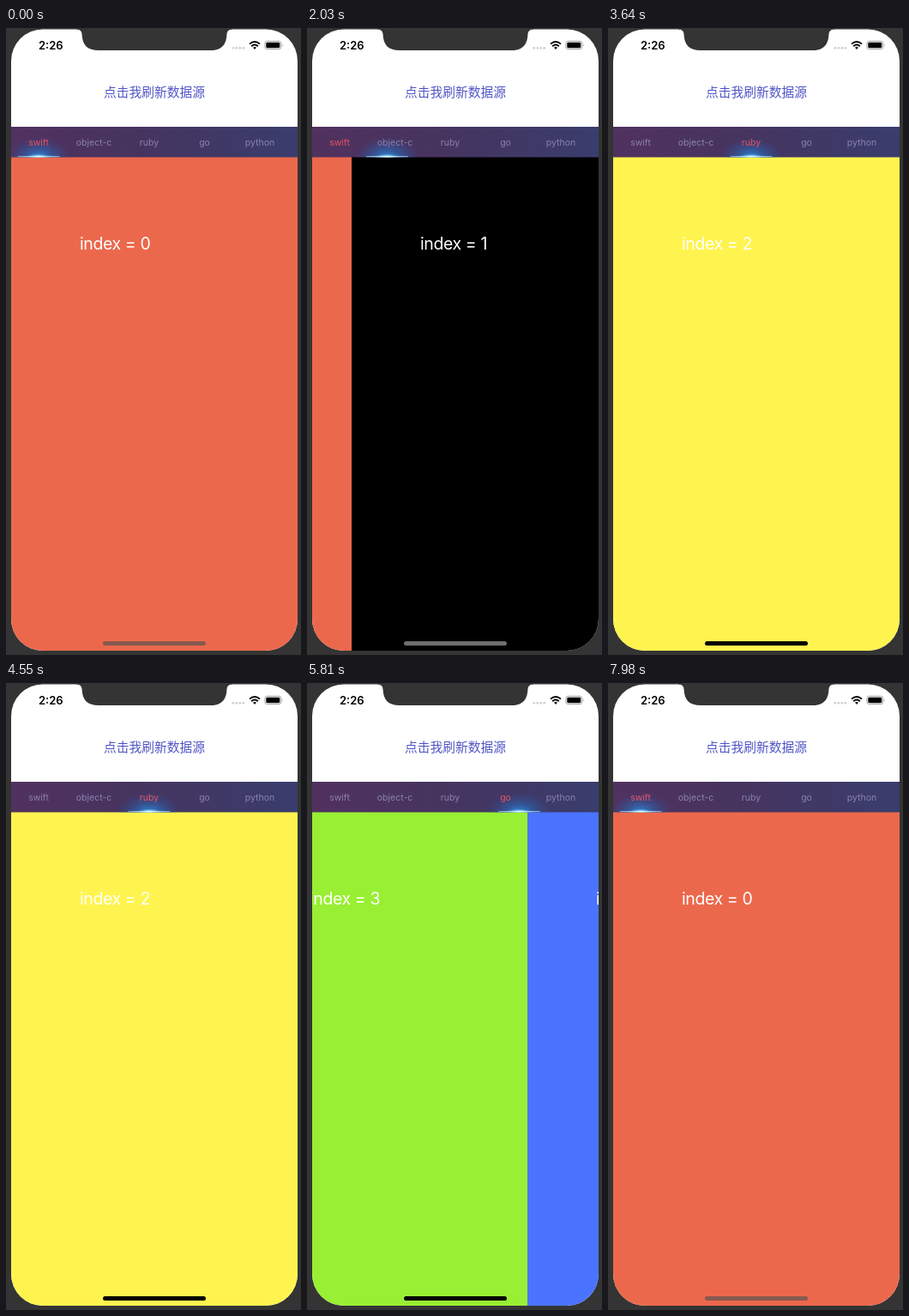
An HTML page for the animation above (8 s loop, 344 px wide and 730 px high).

```html
<!DOCTYPE html>
<html lang="zh">
<head>
<meta charset="utf-8">
<style>
html, body { margin: 0; width: 100%; height: 100%; overflow: hidden; background: #343434; }
svg { display: block; width: 344px; height: 730px; font-family: Inter, Roboto, sans-serif; }
.tab { font-size: 10.5px; text-anchor: middle; fill: #8a81ae; }
.tab.on { fill: #e9535f; }
.page { font-size: 19.5px; letter-spacing: -.4px; fill: #fff; }
.title { font: 14.75px "Noto Sans CJK SC", "Noto Sans CJK", sans-serif; fill: #5056c4; text-anchor: middle; }
</style>
</head>
<body>
<svg viewBox="0 0 344 730">
  <defs>
    <clipPath id="screen"><rect x="6" y="1.5" width="334" height="723.5" rx="37"/></clipPath>
    <clipPath id="barClip"><rect x="6" y="115" width="334" height="35.5"/></clipPath>
    <linearGradient id="bar">
      <stop stop-color="#51315f"/><stop offset=".45" stop-color="#46345f"/><stop offset="1" stop-color="#393d6d"/>
    </linearGradient>
    <radialGradient id="halo">
      <stop stop-color="#318fdd"/><stop offset=".4" stop-color="#2b68b4" stop-opacity=".65"/>
      <stop offset="1" stop-color="#2f4a90" stop-opacity="0"/>
    </radialGradient>
    <radialGradient id="spark">
      <stop stop-color="#fff"/><stop offset=".4" stop-color="#a5e6ff" stop-opacity=".9"/>
      <stop offset="1" stop-color="#4fb4f4" stop-opacity="0"/>
    </radialGradient>
    <linearGradient id="line">
      <stop stop-color="#6d9fd0"/><stop offset=".5" stop-color="#e4faff"/><stop offset="1" stop-color="#6d9fd0"/>
    </linearGradient>
  </defs>
  <g clip-path="url(#screen)">
    <rect width="344" height="730" fill="#fff"/>
    <g id="pages"></g>
    <rect x="6" y="115" width="334" height="35.5" fill="url(#bar)"/>
    <g clip-path="url(#barClip)">
      <g id="glow">
        <ellipse cy="151" rx="38" ry="24" fill="url(#halo)"/>
        <ellipse cy="150.5" rx="15" ry="4" fill="url(#spark)"/>
        <rect x="-24.5" y="149" width="49" height="1.5" fill="url(#line)"/>
      </g>
    </g>
    <g id="tabs"></g>
    <text class="title" x="173" y="80">点击我刷新数据源</text>
    <text x="38" y="24.8" font-size="13" font-weight="600">2:26</text>
    <g fill="#cfcfcf">
      <circle cx="264.8" cy="23.3" r="1.4"/><circle cx="268.8" cy="23.3" r="1.4"/>
      <circle cx="272.8" cy="23.3" r="1.4"/><circle cx="276.8" cy="23.3" r="1.4"/>
    </g>
    <g fill="none" stroke="#000" stroke-width="1.9">
      <path d="M284 18.6Q290 13.4 296 18.6M286.2 21.2Q290 17.8 293.8 21.2"/>
      <path d="M288 22.8Q290 21.2 292 22.8L290 25Z" fill="#000" stroke="none"/>
    </g>
    <rect x="301.9" y="15.3" width="18.8" height="9.4" rx="2.6" fill="none" stroke="#999" stroke-width=".9"/>
    <rect x="303.3" y="16.7" width="16" height="6.6" rx="1.4"/>
    <path d="M322 18.3q1.6 1.7 0 3.4z" fill="#999"/>
    <rect id="home" x="113" y="714" width="120" height="5" rx="2.5"/>
  </g>
  <path d="M82 0V1.5Q88 1.5 88.5 7C89 20 95 26 108 26H238C251 26 257 20 257.500 7Q258 1.500 264 1.500V0Z" fill="#343434"/>
</svg>
<script>
const $ = id => document.getElementById(id);
const names = ['swift', 'object-c', 'ruby', 'go', 'python'];
const colors = ['#ec684c', '#000', '#fff44f', '#99ef33', '#4a74ff'];
const homeColors = ['#87594f', '#6e6e6e', '#000', '#000', '#565f8b'];
const width = 334, swipeTime = 750, tapStart = 7050, tapTime = 350;
const swipes = [1470, 2584, 4773, 5523];

$('pages').innerHTML = colors.map((c, i) =>
  `<rect x="${6 + i * width}" y="150" width="${width}" height="580" fill="${c}"/>
   <text class="page" x="${86 + i * width}" y="258.3">index = ${i}</text>`).join('');
$('tabs').innerHTML = names.map((n, i) =>
  `<text class="tab" x="${38 + i * 64.5}" y="136.500">${n}</text>`).join('');
const tabs = [...$('tabs').children];

const clamp = u => Math.max(0, Math.min(1, u));
const flick = u => 1 - (1 - u ** 2.5) ** 3;
const smooth = u => u * u * (3 - 2 * u);

function draw(t) {
  let pos = 0, selected = 0;
  for (const start of swipes) {
    const u = clamp((t - start) / swipeTime);
    pos += flick(u);
    selected += u === 1;
  }
  if (t >= tapStart) {
    selected = 0;
    pos *= 1 - smooth(clamp((t - tapStart) / tapTime));
  }
  $('pages').setAttribute('transform', `translate(${-Math.round(pos * width)})`);
  $('glow').setAttribute('transform', `translate(${38 + pos * 64.5})`);
  $('home').setAttribute('fill', homeColors[Math.round(pos)]);
  tabs.forEach((tab, i) => tab.classList.toggle('on', i === selected));
}

function frame() {
  const t = performance.now() % 8000;
  draw(Math.floor(t / 70) * 70);
  requestAnimationFrame(frame);
}
frame();
</script>
</body>
</html>
```
